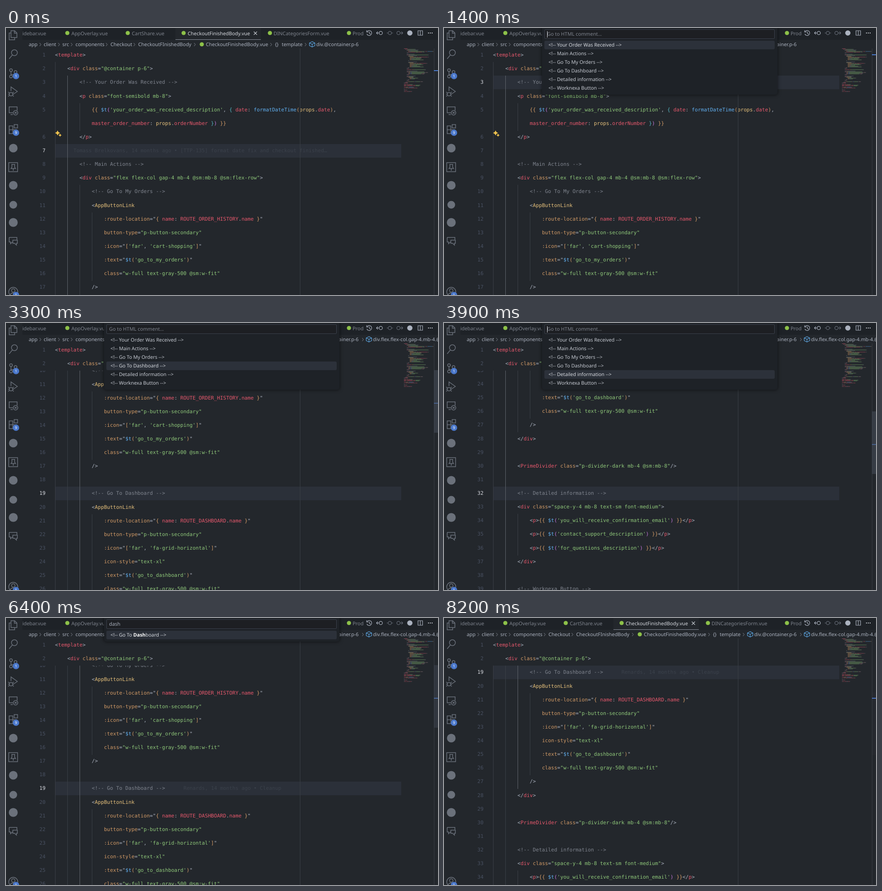
An HTML page with a canvas that plays this animation: 951 px wide and 589 px high, repeating every 8700 ms.

```html
<!DOCTYPE html>
<html lang="en">
<head>
<meta charset="utf-8">
<title>Go to HTML comment</title>
<style>
  html, body { margin: 0; width: 100%; height: 100%; overflow: hidden; background: #23272c; }
  #stage { position: relative; width: 951px; height: 589px; overflow: hidden; background: #23272c;
    color: #abb2bf; font: 10.85px/19px "Noto Sans", "Open Sans", sans-serif; text-rendering: geometricPrecision; }
  #stage div, #stage svg, #stage canvas { position: absolute; }
  #view { left: 36px; top: 45px; width: 834px; height: 544px; overflow: hidden; }
  #code, #sticky { left: -36px; width: 906px; }
  #sticky { top: 0; height: 60px; background: #23272c; }
  .row { left: 0; width: 906px; height: 31px; overflow: hidden; white-space: pre;
    font: 11.18px/30px "DejaVu Sans Mono", monospace; }
  .num { left: 40px; width: 47px; text-align: right; color: #495162; }
  .num.on { color: #d7dae0; }
  .text { left: 108px; }
  .guide { top: 0; width: 1px; height: 31px; background: #3a3f46; }
  .guide.on { background: #5f646c; }
  #bar { left: 108px; width: 762px; height: 30px; background: #2b3039; }
  #blame { color: #3b414b; }
  #caret { width: 2px; height: 30px; background: #528bff; }
  #edge { left: 647px; top: 45px; width: 1px; height: 544px; background: #3a3f45; }
  #lane { left: 942px; top: 45px; width: 9px; height: 544px; box-sizing: border-box; border-left: 1px solid #363b42; }
  #slider { left: 942px; width: 9px; height: 138px; background: rgba(70, 77, 90, .55); }
  #mark { left: 942px; width: 9px; height: 2px; background: #4a7bd0; }
  #map { left: 876px; top: 45px; opacity: .5; }
  #chrome { left: 0; top: 0; }
  #chrome text { fill: #abb2bf; }
  #chrome .dim text { fill: #7f848e; }
  #chrome .badge text { fill: #fff; font-size: 8.5px; text-anchor: middle; }
  #pick { left: 216px; top: 0; width: 518px; background: #1e2227; border-radius: 0 0 5px 5px;
    box-shadow: 0 0 7px 1px rgba(0, 0, 0, .5); }
  #field { left: 5px; top: 3px; width: 505px; height: 19px; border: 1px solid #3b414c; border-radius: 2px;
    background: #1d1f23; line-height: 20px; text-indent: 5px; white-space: pre; }
  #beam { top: 7px; width: 1px; height: 14px; background: #d7dae0; }
  .item { left: 5px; width: 507px; height: 19px; border-radius: 3px; text-indent: 9px; font-size: 10.72px;
    line-height: 21px; color: #c8ccd4; white-space: pre; }
  .item.on { background: #2c313a; color: #d7dae0; }
  .item b { color: #fff; }
</style>
</head>
<body>
<div id="stage">
  <div id="view">
    <div id="code"><div id="bar"></div></div>
    <div id="sticky"></div>
  </div>
  <div id="edge"></div>
  <canvas id="map" width="65" height="110"></canvas>
  <div id="lane"></div><div id="mark"></div><div id="slider"></div>

  <svg id="chrome" width="951" height="589" fill="none">
    <defs>
      <path id="cube" d="M6 0l6 3v6l-6 3-6-3V3zM0 3l6 3 6-3M6 6v6" stroke="#61afef" stroke-width="1.1"/>
      <circle id="dot" r="4.6" fill="#8dc149"/>
    </defs>
    <path d="M36 0h915v26H36z" fill="#1e2227"/>
    <path d="M373 0h188v26H373z" fill="#23272c"/>
    <path d="M373 25.5h188" stroke="#8b919c"/>
    <path d="M36 26h915v19H36z" fill="#23272c"/>
    <g class="dim">
      <text x="30" y="16">Sidebar.vue</text><text x="144" y="16">AppOverlay.vue</text>
      <text x="277" y="16">CartShare.vue</text><text x="589" y="16">DINCategoriesForm.vue</text>
      <text x="763" y="16">Prod</text>
    </g>
    <text x="400" y="16" style="fill:#d7dae0">CheckoutFinishedBody.vue</text>
    <use href="#dot" x="135" y="11"/><use href="#dot" x="268" y="11"/><use href="#dot" x="391" y="11"/>
    <use href="#dot" x="581" y="11"/><use href="#dot" x="755" y="11"/><use href="#dot" x="431" y="36"/>
    <path d="M545.500 8l7 7m0-7l-7 7" stroke="#c5c9d0" stroke-width="1.2"/>

    <g>
      <text x="50" y="40">app</text><text x="83" y="40">client</text><text x="124" y="40">src</text>
      <text x="153" y="40">components</text><text x="230" y="40">Checkout</text>
      <text x="291" y="40">CheckoutFInishedBody</text><text x="440" y="40">CheckoutFinishedBody.vue</text>
      <text x="592" y="40">{}</text><text x="607" y="40">template</text><text x="683" y="40">div.@container.p-6</text>
      <use href="#cube" x="668" y="30"/>
      <path d="M74 33l3 3.500-3 3.500M115 33l3 3.500-3 3.500M143 33l3 3.500-3 3.500M220 33l3 3.500-3 3.500M281 33l3 3.500-3 3.500M414 33l3 3.500-3 3.500M582 33l3 3.500-3 3.500M658 33l3 3.500-3 3.500" stroke="#7f848e"/>
    </g>
    <g id="crumb">
      <path d="M784 33l3 3.500-3 3.500" stroke="#7f848e"/><use href="#cube" x="793" y="30"/>
      <text x="808" y="40">div.flex.flex-col.gap-4.mb-4.@sm:mb-8</text>
    </g>

    <path d="M788 0h163v25H788z" fill="#1e2227"/>
    <g stroke="#abb2bf" stroke-width="1.200">
      <path d="M795 8a5.500 5.500 0 1 1-.6 5M794 5v4h4M800 8v4l3 1.500"/>
      <circle cx="825" cy="11" r="3.700"/><path d="M821 11h-5m2.500-3l-3 3 3 3"/>
      <path d="M907 6h10v10h-10zM912 6v10"/>
    </g>
    <g stroke="#646a75" stroke-width="1.200">
      <circle cx="845" cy="11" r="3.700"/><path d="M838 11h3m8 0h3"/>
      <circle cx="864" cy="11" r="3.700"/><path d="M868 11h5m-2.500-3l3 3-3 3"/>
    </g>
    <circle cx="889" cy="11" r="5.800" fill="#abb2bf"/>
    <path d="M929 11h2m2 0h2m2 0h2" stroke="#c5c9d0" stroke-width="2"/>

    <path d="M0 0h36v589H0z" fill="#23272c"/>
    <g stroke="#6b717b" stroke-width="1.500">
      <path d="M11 6h8l5 5v10H11zM11 11H7v15h12v-5M18.500 6v5.500H24"/>
      <circle cx="18.500" cy="54.500" r="6.500"/><path d="M14 59.500L7 68"/>
      <circle cx="11" cy="93" r="3"/><circle cx="21" cy="97" r="3"/><circle cx="11" cy="107" r="3"/>
      <path d="M11 96v8M21 100c0 4-9 1-10 4"/>
      <path d="M11 139v-9l14 10-9 6"/><circle cx="11" cy="146" r="3.800"/><path d="M5 141l3 3m-3 2h2m-2 5l3-3m9-7l-3 3m3 2h-2m2 5l-3-3"/>
      <path d="M15 187H7v-13h17.500v8M10 191h5"/><circle cx="21" cy="187" r="5"/><path d="M19 185l2 2-2 2m4-4l-1 2 1 2"/>
      <path d="M7 216h8v17H7zM7 224.500h16.500V233H15M18 213h7.500v7.500H18z"/>
      <path d="M6 297h19.500v20H6zM12 301h8m-7 0v6l-2 3h10l-2-3v-6m-3 9v5"/>
      <path d="M7 462h17v5M7 462v10h3v4l4-4M15 468h10v7h-2v4l-4-4h-4z"/>
      <circle cx="16" cy="582" r="10"/><circle cx="16" cy="579" r="3.800"/><path d="M9 589c2-6 12-6 14 0"/>
    </g>
    <g fill="#6b717b">
      <circle cx="16" cy="265" r="9.500"/><circle cx="16" cy="347" r="9.500"/>
      <circle cx="16" cy="390" r="8.500"/><circle cx="16" cy="429" r="9.800"/>
    </g>
    <g class="badge" fill="#4a78cc">
      <circle cx="22" cy="106" r="7"/><circle cx="22" cy="231" r="7"/><circle cx="22" cy="589" r="7"/>
      <text x="22" y="109">1</text><text x="22" y="234">9</text><text x="22" y="592">1</text>
    </g>
  </svg>

  <div id="pick"></div>
</div>

<script>
const SRC = `<template>
    <div class="@container p-6">
        <!-- Your Order Was Received -->
        <p class="font-semibold mb-8">
            {{ $t('your_order_was_received_description', { date: formatDateTime(props.date),~            master_order_number: props.orderNumber }) }}
        </p>

        <!-- Main Actions -->
        <div class="flex flex-col gap-4 mb-4 @sm:mb-8 @sm:flex-row">
            <!-- Go To My Orders -->
            <AppButtonLink
                :route-location="{ name: ROUTE_ORDER_HISTORY.name }"
                button-type="p-button-secondary"
                :icon="['far', 'cart-shopping']"
                :text="$t('go_to_my_orders')"
                class="w-full text-gray-500 @sm:w-fit"
            />

            <!-- Go To Dashboard -->
            <AppButtonLink
                :route-location="{ name: ROUTE_DASHBOARD.name }"
                button-type="p-button-secondary"
                :icon="['far', 'fa-grid-horizontal']"
                icon-style="text-xl"
                :text="$t('go_to_dashboard')"
                class="w-full text-gray-500 @sm:w-fit"
            />
        </div>

        <PrimeDivider class="p-divider-dark mb-4 @sm:mb-8"/>

        <!-- Detailed information -->
        <div class="space-y-4 mb-8 text-sm font-medium">
            <p>{{ $t('you_will_receive_confirmation_email') }}</p>
            <p>{{ $t('contact_support_description') }}</p>
            <p>{{ $t('for_questions_description') }}</p>
        </div>

        <!-- Worknexa Button -->
        <div class="flex">
            <AppButtonLink
                :text="$t('follow_us')"
                class="w-full"
            />
        </div>

        <p class="text-sm">{{ $t('thank_you') }}</p>
    </div>
</template>

<script setup lang="ts">
import { formatDateTime } from '@/utils/date'
import { ROUTE_DASHBOARD } from '@/routes'

const props = defineProps({
    date: String, orderNumber: String
})

<\/script>

<style scoped></style>`;

const COMMANDS = ['Go to HTML comment', 'Format Document', 'View: Toggle Terminal', 'Developer: Reload Window',
  'File: Save All', 'View: Toggle Word Wrap', 'Git: Checkout to...', 'Editor: Fold All', 'Editor: Unfold All',
  'Preferences: Color Theme', 'Transform to Lowercase', 'Transform to Uppercase', 'View: Split Editor',
  'Sort Lines Ascending'];

const LOOP = 8700, STEP = 100, ROW = 30.12, CH = 6.73;
const RED = '#e5586c', GREEN = '#8fc87a', ORANGE = '#d19a66', BLUE = '#61afef', YELLOW = '#e5c07b', GREY = '#abb2bf';
const BRACKETS = [ORANGE, '#c678dd', '#56b6c2'];

const $ = id => document.getElementById(id);
const topOf = i => Math.round(i * ROW + .2);
function add(parent, cls, text = '') {
  const e = document.createElement('div');
  e.className = cls;
  e.textContent = text;
  parent.append(e);
  return e;
}

// Syntax colouring: returns [colour, text] pairs
let depth = 0;
function paint(s) {
  const out = [];
  const rx = /<!--.*|(<\/?)(\w+)|([:@]?[\w-]+)="([^"]*)"|'[^']*'|\{\{|\}\}|[{}()[\]]|[$\w]+|\s+|./g;
  for (const m of s.matchAll(rx)) {
    const w = m[0];
    if (w.startsWith('<!--')) out.push(['#7f848e', w]);
    else if (m[2]) out.push([GREY, m[1]], [m[2].startsWith('App') ? YELLOW : RED, m[2]]);
    else if (m[3]) {
      out.push([ORANGE, m[3]], [GREY, '=']);
      if (m[3][0] === ':') out.push([GREY, '"'], ...paint(m[4]), [GREY, '"']);
      else out.push([GREEN, `"${m[4]}"`]);
    }
    else if (w[0] === "'") out.push([GREEN, w]);
    else if (/^[{([]/.test(w)) out.push([BRACKETS[depth++ % 3], w]);
    else if (/^[})\]]/.test(w)) out.push([BRACKETS[--depth % 3], w]);
    else if (/^[$\w]/.test(w)) out.push([s[m.index + w.length] === '(' ? BLUE : w === 'props' ? YELLOW : RED, w]);
    else out.push([GREY, w]);
  }
  return out;
}

// Rows of the editor; a "~" marks a soft wrap
const rows = [];
SRC.split('\n').forEach((line, i) => line.split('~').forEach((text, k) =>
  rows.push({ text, num: k ? '' : i + 1, indent: text.search(/\S/), tokens: paint(text) })));
rows.forEach((r, i) => {
  r.level = r.indent < 0 ? Math.min(rows[i - 1].indent, rows[i + 1].indent) : r.indent;
});
const rowOf = line => rows.findIndex(r => r.num === line);

function drawRow(r, parent, top) {
  const e = add(parent, 'row');
  e.style.top = top + 'px';
  r.guides = [];
  for (let c = 0; c < r.level; c += 4) {
    const g = add(e, 'guide');
    g.style.left = Math.round(108 + c * CH) + 'px';
    r.guides.push(g);
  }
  r.label = add(e, 'num', r.num);
  const t = add(e, 'text');
  for (const [color, word] of r.tokens) {
    const s = document.createElement('span');
    s.style.color = color;
    s.textContent = word;
    t.append(s);
  }
}

const code = $('code'), map = $('map').getContext('2d');
drawRow({ ...rows[0] }, $('sticky'), topOf(0));
drawRow({ ...rows[1], level: 0 }, $('sticky'), topOf(1));
rows.forEach((r, i) => {
  drawRow(r, code, topOf(i));
  let x = 0;
  for (const [color, word] of r.tokens) {
    map.fillStyle = color;
    if (word.trim()) map.fillRect(x * .8, i * 1.55, word.length * .8, 1);
    x += word.length;
  }
});

const blame = add(add(code, 'row'), 'text');
blame.id = 'blame';
const caret = add(code, '');
caret.id = 'caret';
code.insertAdjacentHTML('beforeend', `<svg id="spark" style="left:108px;top:181px" width="16" height="16" fill="#f0c34e">
  <path d="M5.500 0l1.900 3.600L11 5.500 7.400 7.400 5.500 11 3.600 7.400 0 5.500l3.600-1.900zM11 7l1.200 2.300L14.500 10.500l-2.300 1.200L11 14l-1.200-2.300L7.500 10.500l2.300-1.200z"/></svg>`);

const comments = rows.filter(r => r.text.includes('<!--')).map(r => r.text.trim());

// Timeline: [time, value] lists, the last entry reached counts
const at = (list, t) => list.reduce((v, [k, x]) => t >= k ? x : v, undefined);
const within = (t, ...spans) => spans.some(([a, b]) => t >= a && t < b);
const LINE = [[0, 7], [1400, 3], [2200, 8], [2900, 10], [3100, 19], [3800, 32], [5400, 19]];
const CHOICE = [[0, 0], [2200, 1], [2900, 2], [3100, 3], [3800, 4], [5300, 0]];
const QUERY = [[0, ''], [5300, 'd'], [5400, 'da'], [5500, 'das'], [5600, 'dash']];
const SCROLLS = [[3050, 256], [3750, 648], [5350, 256], [6550, 512]];
const LONG = 'Tomass Brelkovans, 14 months ago • [TTP-135] format date fix and checkout finished…';
const SHORT = 'Renards, 14 months ago • Cleanup';
const BLAME = [[0, LONG], [1400, ''], [2600, LONG], [2900, ''], [4400, LONG], [5400, ''], [5900, SHORT]];
const FADES = [[0, 0, 0], [2200, 4900, 5700], [5400, 6200, 7000], [6600, 7500, 8300]];

function scrollAt(t) {
  let y = 0;
  for (const [start, to] of SCROLLS) {
    const p = Math.min(1, Math.max(0, (t - start) / 140));
    y += (to - y) * (1 - (1 - p) ** 3);
  }
  return Math.round(y);
}

function sliderAlpha(t) {
  const [, from, to] = FADES.filter(f => t >= f[0]).pop();
  return t < from ? 1 : to ? Math.max(0, 1 - (t - from) / (to - from)) : 0;
}

function drawPick(t) {
  const pick = $('pick'), open = within(t, [600, 6600]);
  pick.style.display = open ? '' : 'none';
  if (!open) return;
  pick.textContent = '';
  const palette = t < 1400, q = palette ? '' : at(QUERY, t), typed = palette ? '>' : q;
  const field = add(pick, '', typed || 'Go to HTML comment...');
  field.id = 'field';
  if (!typed) field.style.color = '#7f848e';
  let list = palette ? COMMANDS : comments;
  if (q) list = list.filter(s => s.toLowerCase().includes(q)).sort();
  list.forEach((s, i) => {
    const e = add(pick, i === at(CHOICE, t) ? 'item on' : 'item', s);
    e.style.top = 28 + 19 * i + 'px';
    if (q) {
      const k = s.toLowerCase().indexOf(q), b = document.createElement('b');
      b.textContent = s.slice(k, k + q.length);
      e.replaceChildren(s.slice(0, k), b, s.slice(k + q.length));
    }
  });
  pick.style.height = 33 + 19 * list.length + 'px';
  if (within(t, [600, 1200], [1400, 2000], [2600, 3100], [3800, 4400], [4900, 6200])) {
    const beam = add(pick, '');
    beam.id = 'beam';
    beam.style.left = 11 + 6 * typed.length + 'px';
  }
}

function draw(t) {
  const line = at(LINE, t), n = rowOf(line), r = rows[n], top = topOf(n), y = scrollAt(t);
  code.style.top = -y + 'px';
  $('sticky').style.display = y ? '' : 'none';
  $('bar').style.top = top + 'px';
  $('mark').style.top = 44 + Math.round(6.96 * n) + 'px';
  $('slider').style.top = 45 + Math.round(y * .2315) + 'px';
  $('slider').style.opacity = sliderAlpha(t);

  // The guide of the block around the active line is lit
  const k = r.level / 4 - 1;
  let a = n, b = n;
  while (rows[a - 1].level > k * 4) a--;
  while (rows[b + 1].level > k * 4) b++;
  rows.forEach((row, i) => {
    row.label.classList.toggle('on', i === n);
    row.guides.forEach((g, j) => g.classList.toggle('on', j === k && i >= a && i <= b));
  });

  blame.textContent = at(BLAME, t);
  blame.parentNode.style.top = top + 'px';
  blame.style.left = 108 + (r.text.length + 6) * CH + 'px';
  caret.style.top = top + 'px';
  caret.style.left = 108 + Math.round(Math.max(0, r.indent) * CH) + 'px';
  caret.style.display = within(t, [100, 600], [6600, 7100], [7600, 8100]) ? '' : 'none';
  $('spark').style.display = within(t, [1700, 2200]) ? 'none' : '';
  $('crumb').style.display = within(t, [3200, 4100], [5500, LOOP]) ? '' : 'none';
  drawPick(t);
}

const start = performance.now();
let last = -1;
function tick() {
  const t = Math.floor((performance.now() - start) % LOOP / STEP) * STEP;
  if (t !== last) draw(last = t);
  requestAnimationFrame(tick);
}
tick();
</script>
</body>
</html>
```
